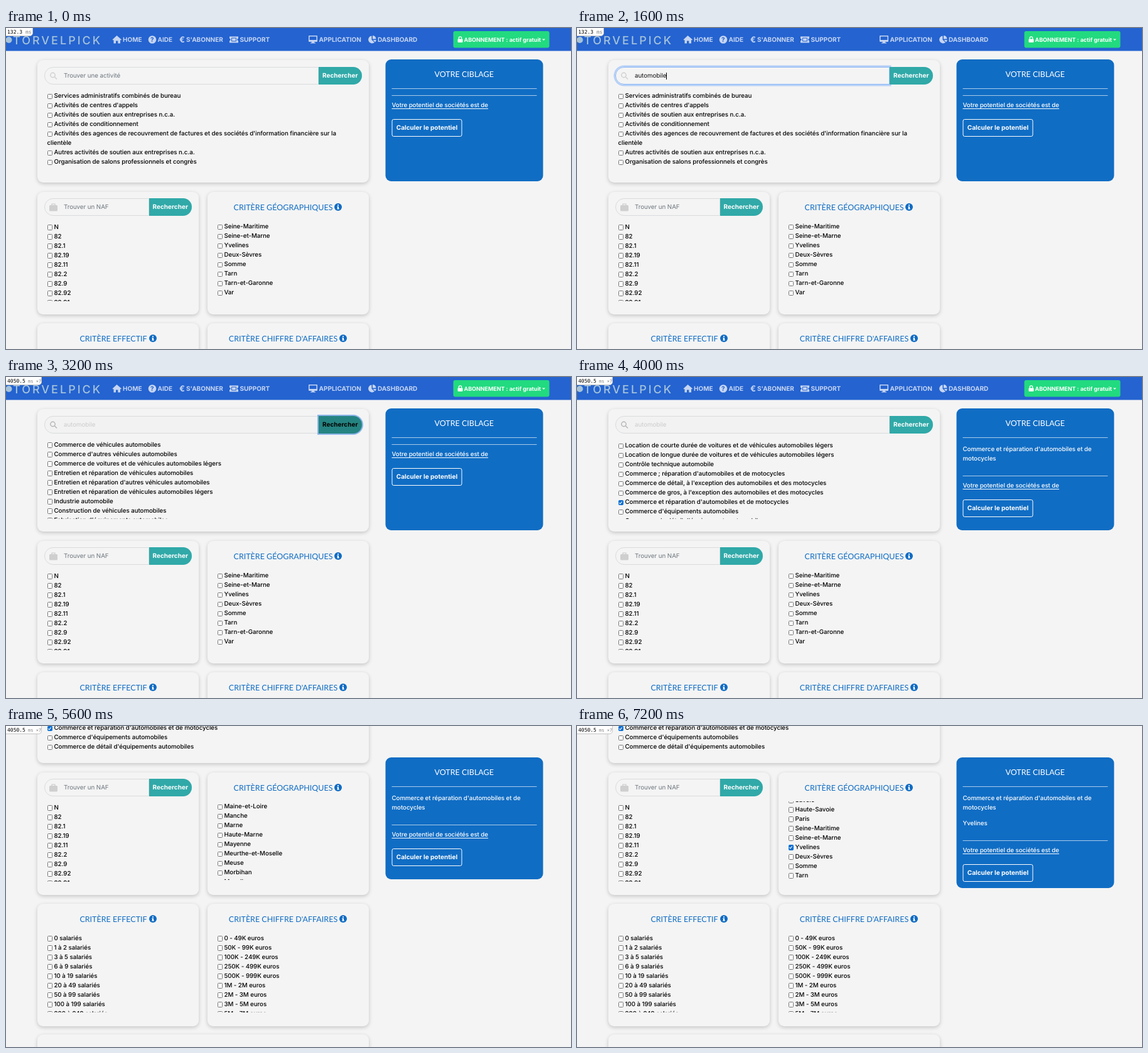
An HTML page that plays this animation: 900x511 px, repeating every 8 s.

```html
<!DOCTYPE html>
<html lang="fr">
<head>
<meta charset="utf-8">
<style>
html, body { margin: 0; width: 100%; height: 100%; overflow: hidden; background: #f4f4f4; }
body { position: relative; font: 450 9.75px/15px Inter, sans-serif; letter-spacing: -.06px; color: #000;
  text-rendering: geometricPrecision; white-space: nowrap; }
div, b, i, #page > svg { position: absolute; box-sizing: border-box; }
i { font-style: normal; }
#page { left: 0; top: 0; width: 900px; height: 740px; }
.card { border-radius: 9px; background: #f4f4f4; box-shadow: 0 2px 6px rgba(0,0,0,.2); }
.title { left: 0; width: 100%; top: 17px; text-align: center; font: 12.5px/15px Lato, sans-serif; letter-spacing: 0; color: #0f6cc4; }
.title svg { vertical-align: -1.5px; margin-left: 3px; }
.list { height: 125px; overflow: hidden; }
.rows { left: 0; width: 100%; }
.row { position: relative; height: 15px; padding-left: 11px; }
.row.wrap { padding-left: 0; }
.row i { left: 0; top: 3.5px; width: 8.5px; height: 8.5px; border: 1px solid #767676; border-radius: 1.5px; background: #fff; }
.row.on i { border-color: #0b6fd0; background: #0b6fd0; }
.row.on i::after { content: ""; position: absolute; left: 1.8px; top: 0; width: 1.8px; height: 3.8px;
  border: solid #fff; border-width: 0 1.3px 1.3px 0; transform: rotate(42deg); }
.field { height: 28px; border: 1px solid #d9dbdd; border-radius: 14px 0 0 14px; padding-left: 30px; line-height: 27px;
  font-weight: 400; color: #6c757d; }
.field svg { position: absolute; left: 7px; top: 7px; color: #cfcfcf; }
.field.focus { border-color: #8fb9f5; box-shadow: 0 0 0 2.5px #b5d0f7; color: #111; }
.field.focus .text { border-right: 1px solid #000; }
.field.done { color: #ccc; background: #f2f2f2; }
.field.done svg { color: #b4b4b4; }
.button { height: 28px; border-radius: 0 14px 14px 0; background: #30a9a8; color: #fff;
  font: bold 10px/28px Inter, sans-serif; letter-spacing: 0; text-align: center; }
.button.focus { background: #258482; color: #000; box-shadow: 0 0 0 2px #8db5ea; }
#side { left: 604px; top: 50px; width: 250.5px; border-radius: 9px; background: #106dc4; color: #fff; transform: translateX(.5px); }
#side .title { top: 16px; color: #fff; }
.rule { left: 10px; width: 231px; height: 1px; background: #a9cbe9; }
#foot { left: 10px; width: 231px; }
#foot u { position: absolute; top: 9px; text-underline-offset: 1.5px; }
#foot b { top: 37.5px; width: 112px; height: 28.75px; border: 1px solid #fff; border-radius: 3px;
  font: bold 10px/27px Inter, sans-serif; letter-spacing: 0; text-align: center; }
#badge { left: -1px; top: -1px; height: 14px; padding-left: 2px; border: 1px solid #c4c4c4; border-radius: 0 0 5px 0;
  background: #fff; font: 8px/13px "DejaVu Sans Mono", monospace; letter-spacing: 0; color: #808080; }
#badge span { color: #000; }
#badge small { font-size: 7px; }
</style>
</head>
<body>
<div id="page">
  <svg width="900" height="37" fill="#c6d5f1" font-family="Inter, sans-serif" font-weight="700" font-size="10" letter-spacing="0">
    <rect width="900" height="36.500" fill="#2463d0"/>
    <g fill="#a6c3d9">
      <circle cx="4.500" cy="19" r="5"/>
      <text x="11" y="25.500" font-size="18" font-weight="500" letter-spacing="3">TORVELPICK</text>
    </g>
    <path d="M169.500 18.500 176.500 12 184 18.500 183 19.500 182 18.700V24.500H178.300V20.500H175V24.500H171.500V18.700L170.500 19.500Z"/>
    <circle cx="233" cy="18.500" r="6.300"/>
    <text x="230" y="22" fill="#2463d0">?</text>
    <text x="276" y="23" font-size="13">€</text>
    <path d="M356 13.500H370V16.800A1.700 1.700 0 0 0 370 20.200V23.500H356V20.200A1.700 1.700 0 0 0 356 16.800Z"/>
    <path d="M359.500 16H366.500V21H359.500Z" fill="none" stroke="#2463d0"/>
    <path fill-rule="evenodd" d="M483 12H495Q496 12 496 13V21Q496 22 495 22H491L491.500 23.500H493V24.500H485V23.500H486.500L487 22H483Q482 22 482 21V13Q482 12 483 12ZM483.500 13.500V19H494.500V13.500Z"/>
    <path d="M582.500 12.500V18.700L587 23A6 6 0 1 1 582.500 12.500ZM584 12A6 6 0 0 1 589.500 17.500H584ZM584.500 19H589.800A6 6 0 0 1 588 22.500Z"/>
    <text x="186" y="22">HOME</text>
    <text x="241.500" y="22">AIDE</text>
    <text x="287" y="22">S'ABONNER</text>
    <text x="372.500" y="22">SUPPORT</text>
    <text x="498.500" y="22">APPLICATION</text>
    <text x="592" y="22">DASHBOARD</text>
    <rect x="712.500" y="5" width="153" height="26.500" rx="3" fill="#22da7f"/>
    <g fill="#fff">
      <rect x="719.500" y="17.500" width="8" height="5.500" rx="1"/>
      <path d="M721.300 18V16A2.200 2.200 0 0 1 725.700 16V18" fill="none" stroke="#fff" stroke-width="1.300"/>
      <text x="729.500" y="21.800" font-size="9" letter-spacing="-.05">ABONNEMENT : actif gratuit</text>
      <path d="M854 17.500H859L856.500 20Z"/>
    </g>
  </svg>
</div>
<div id="side">
  <div class="title">VOTRE CIBLAGE</div>
  <div class="rule" style="top:46px"></div>
  <div id="chosen" style="left:10px;top:57.5px"></div>
  <div id="foot"><div class="rule" style="left:0;top:0"></div><u>Votre potentiel de sociétés est de</u><b>Calculer le potentiel</b></div>
</div>
<div id="badge"></div>
<script>
const STEP = 800, STEPS = 10;
const $ = id => document.getElementById(id);
const page = $('page');

function add(cls, x, y, w, h, html = '', parent = page) {
  const el = document.createElement('div');
  el.className = cls;
  el.style.cssText = `left:${x}px;top:${y}px;width:${w}px;` + (h ? `height:${h}px` : '');
  el.innerHTML = html;
  parent.append(el);
  return el;
}

const info = `<svg width="12" height="12"><circle cx="6" cy="6" r="6" fill="#0f6cc4"/>
  <path d="M5 2.300H7V4H5ZM4.300 5H7V8.300H7.800V9.500H4.300V8.300H5V6.200H4.300Z" fill="#fff"/></svg>`;
const lens = `<svg width="13" height="13" fill="none" stroke="currentColor" stroke-width="1.400">
  <circle cx="5.500" cy="5" r="3.700"/><path d="M8.300 7.800 12 11.500"/></svg>`;
const bag = `<svg width="13" height="13" fill="currentColor"><rect y="3" width="13" height="9.500" rx="1.500"/>
  <path d="M4 3V1.200H9V3" fill="none" stroke="currentColor" stroke-width="1.300"/></svg>`;

const card = (x, y, w, h, title) =>
  add('card', x, y, w, h, title ? `<div class="title">${title}${info}</div>` : '');

// A leading ">" marks the wrapped end of the label above.
const rowsHtml = labels => labels.map(label => label[0] === '>'
  ? `<div class="row wrap">${label.slice(1)}</div>`
  : `<div class="row"><i></i>${label}</div>`).join('');

function list(x, y, w, labels) {
  return add('rows', 0, 0, w, 0, rowsHtml(labels), add('list', x, y, w));
}

function search(y, right, icon, hint) {
  return {
    field: add('field', 61, y, right - 61, 0, `${icon}<span class="text">${hint}</span>`),
    button: add('button', right, y, 68.5, 0, 'Rechercher')
  };
}

const services = ['Services administratifs combinés de bureau', "Activités de centres d'appels",
  'Activités de soutien aux entreprises n.c.a.', 'Activités de conditionnement',
  "Activités des agences de recouvrement de factures et des sociétés d'information financière sur la", '>clientèle',
  'Autres activités de soutien aux entreprises n.c.a.', 'Organisation de salons professionnels et congrès'];
const cars = ['Commerce de véhicules automobiles', "Commerce d'autres véhicules automobiles",
  'Commerce de voitures et de véhicules automobiles légers', 'Entretien et réparation de véhicules automobiles',
  "Entretien et réparation d'autres véhicules automobiles", 'Entretien et réparation de véhicules automobiles légers',
  'Industrie automobile', 'Construction de véhicules automobiles', "Fabrication d'équipements automobiles",
  'Location de courte durée de voitures et de véhicules automobiles légers',
  'Location de longue durée de voitures et de véhicules automobiles légers', 'Contrôle technique automobile',
  "Commerce ; réparation d'automobiles et de motocycles",
  "Commerce de détail, à l'exception des automobiles et des motocycles",
  "Commerce de gros, à l'exception des automobiles et des motocycles",
  "Commerce et réparation d'automobiles et de motocycles", "Commerce d'équipements automobiles",
  "Commerce de détail d'équipements automobiles"];
const places = ('Ain,Aisne,Allier,Alpes-de-Haute-Provence,Hautes-Alpes,Alpes-Maritimes,Ardèche,Ardennes,Ariège,' +
  'Maine-et-Loire,Manche,Marne,Haute-Marne,Mayenne,Meurthe-et-Moselle,Meuse,Morbihan,Moselle,' +
  'Savoie,Haute-Savoie,Paris,Seine-Maritime,Seine-et-Marne,Yvelines,Deux-Sèvres,Somme,Tarn,Tarn-et-Garonne,Var').split(',');
const staff = ['0', '1 à 2', '3 à 5', '6 à 9', '10 à 19', '20 à 49', '50 à 99', '100 à 199', '200 à 249'];
const turnover = ['0 - 49K', '50K - 99K', '100K - 249K', '250K - 499K', '500K - 999K', '1M - 2M', '2M - 3M', '3M - 5M', '5M - 7M'];

card(50, 51, 527.5, 195);
card(50, 260.5, 257, 195);
card(320.5, 260.5, 257, 195, 'CRITÈRE GÉOGRAPHIQUES');
card(50, 469.5, 257, 195.5, 'CRITÈRE EFFECTIF');
card(320.5, 469.5, 257, 195.5, "CRITÈRE CHIFFRE D'AFFAIRES");
card(50, 678, 527.5, 62);

const activity = search(62, 498, lens, '');
const query = activity.field.querySelector('.text');
search(271, 227.5, bag, 'Trouver un NAF');

const serviceRows = list(65.5, 100.5, 500, services);
const carRows = list(65.5, 100.5, 500, cars);
list(65.5, 309.5, 230, ['N', '82', '82.1', '82.19', '82.11', '82.2', '82.9', '82.92', '82.91']);
const placeRows = list(336.5, 307, 230, places);
list(65.5, 517.5, 230, staff.map(n => n + ' salariés'));
list(336.5, 517.5, 230, turnover.map(n => n + ' euros'));
serviceRows.style.top = '.5px';

function render(step) {
  const found = step >= 3, picked = step >= 5, scrolled = step >= 6, placed = step >= 9;
  page.style.top = (scrolled ? -187 : 0) + 'px';

  query.textContent = ['Trouver une activité', 'auto'][step] || 'automobile';
  activity.field.classList.toggle('focus', step === 1 || step === 2);
  activity.field.classList.toggle('done', found);
  activity.button.classList.toggle('focus', found && !picked);

  serviceRows.hidden = found;
  carRows.hidden = !found;
  carRows.style.top = (scrolled ? -142.5 : picked ? -133.5 : 0) + 'px';
  carRows.children[15].classList.toggle('on', picked);
  placeRows.style.top = (step < 6 ? -313 : step === 6 ? 1 : step === 7 ? -134 : -279.5) + 'px';
  placeRows.children[places.indexOf('Yvelines')].classList.toggle('on', placed);

  $('chosen').innerHTML = (picked ? "Commerce et réparation d'automobiles et de<br>motocycles" : '') +
    (placed ? '<br><div style="top:40px">Yvelines</div>' : '');
  $('foot').style.top = (placed ? 132 : picked ? 107 : 57) + 'px';
  $('side').style.height = (placed ? 208 : 194) + 'px';

  $('badge').innerHTML = found ? '<span>4050.5</span><small> ms ×7</small>' : '<span>132.3</span> ms';
  $('badge').style.width = (found ? 58 : 44) + 'px';
}

let shown = -1;
function tick(now) {
  const step = Math.floor(now / STEP) % STEPS;
  if (step !== shown) render(shown = step);
  requestAnimationFrame(tick);
}
tick(performance.now());
</script>
</body>
</html>
```
